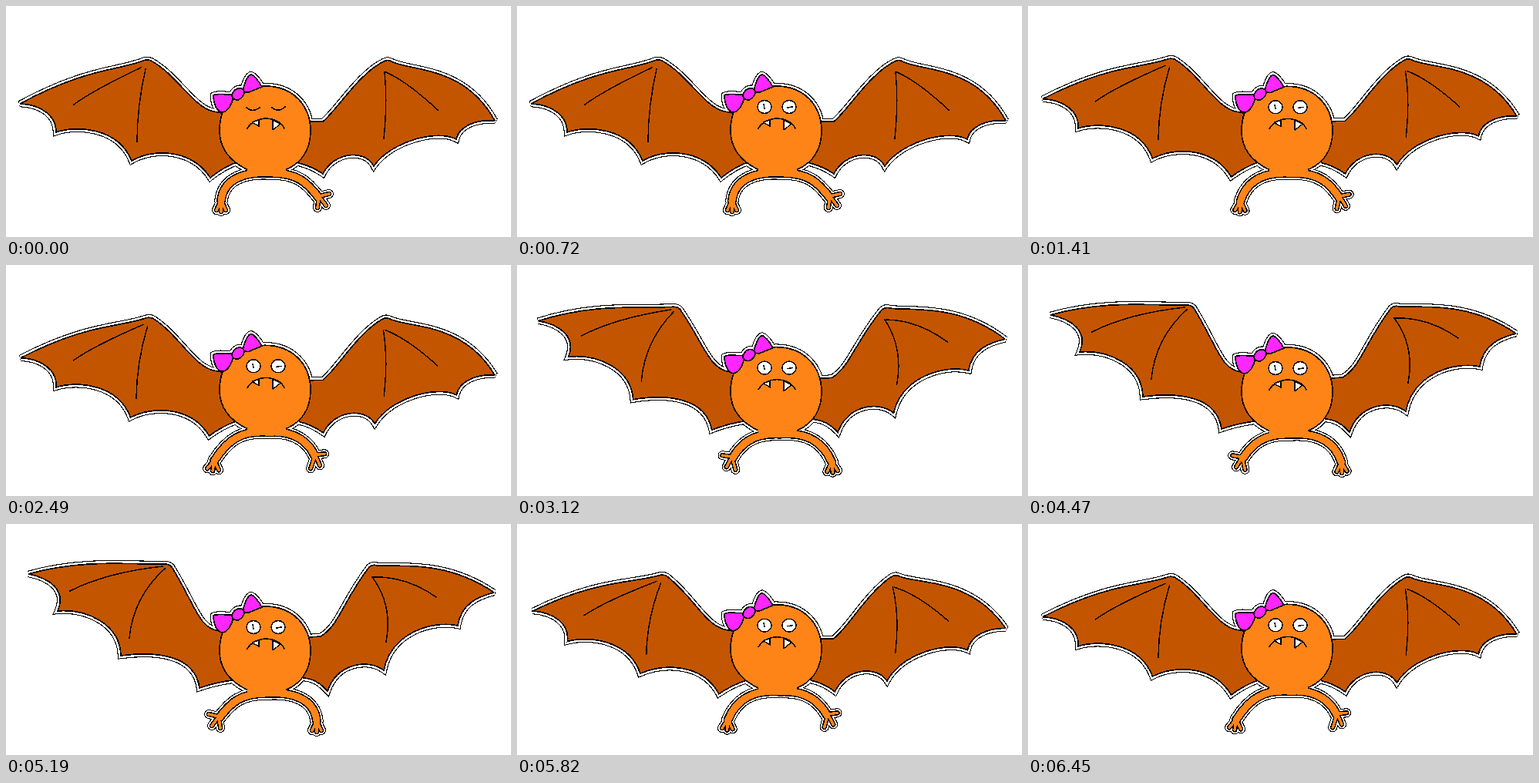
An HTML page that plays this animation: 655x300 px, repeating every 6480 ms.

```html
<!DOCTYPE html>
<html lang="en">
<head>
<meta charset="utf-8">
<title>Flapping bat</title>
<style>
  html, body { margin: 0; width: 100%; height: 100%; overflow: hidden; background: #fff; }
  svg { display: block; width: 655px; height: 300px; }
  path { stroke-linecap: round; stroke-linejoin: miter; stroke-miterlimit: 2; }
</style>
</head>
<body>
<svg id="stage" viewBox="0 0 655 300" shape-rendering="crispEdges"></svg>
<script>
const STEP = 30, COUNT = 216, MIRROR = 682;
const ORANGE = '#ff8418', BROWN = '#c45500', PINK = '#ff26ff', INK = '#000';
const stage = document.getElementById('stage');

function add(parent, tag, attrs = {}) {
  const el = document.createElementNS('http://www.w3.org/2000/svg', tag);
  for (const key in attrs) el.setAttribute(key, attrs[key]);
  return parent.appendChild(el);
}

// Blends the numbers of two paths that share the same commands.
function blend(a, b, k) {
  const to = b.match(/-?[\d.]+/g);
  let i = 0;
  return a.replace(/-?[\d.]+/g, n => (+n + (to[i++] - n) * k).toFixed(2));
}

function track(keys, x) {
  let i = 1;
  while (i < keys.length - 1 && x > keys[i][0]) i++;
  const [x0, a] = keys[i - 1], [x1, b] = keys[i], k = (x - x0) / (x1 - x0);
  return typeof a === 'number' ? a + (b - a) * k : blend(a, b, k);
}

// Down and up poses.
const leftWing = [
  'M320 160L277 138C245 138 226 92 188 71Q183 69 178 71C145 84 105 80 18 127C45 128 65 142 65 164C90 155 145 157 163 201C190 185 240 185 265 223Q281 210 299 203Z',
  'M320 160L277 139C250 136 246 106 215 56Q212 52 206 52C160 53 100 45 29 65C55 70 79 85 67 113C105 110 148 130 149 171C195 165 245 170 251 213Q271 206 293 203Z'];
const leftVeins = [
  'M175 80Q112 110 88 128M181 82Q170 130 170 176',
  'M203 55Q130 63 83 87M206 58Q165 95 160 148'];
const rightWing = [
  'M350 160L393 150L411 150C428 137 458 87 490 72Q495 69 500 72C525 85 595 77 634 149C612 147 588 155 584 173C560 160 500 175 477 208C465 185 425 190 411 218Q396 208 380 204Z',
  'M350 160L393 147L408 146C432 132 436 102 471 56Q475 52 482 54C510 56 570 46 633 89C610 95 590 105 586 132C555 125 500 140 490 190C470 175 430 180 417 217Q403 201 386 200Z'];
const rightVeins = [
  'M491 86Q495 125 490 172M493 86Q520 98 560 135',
  'M475 69Q502 105 493 153M477 69Q520 68 558 95'];

// Left arm poses along the swing; the right arm mirrors them.
const armKeys = [
  [0, 'M341 217C311 215 282 224 279 253'],
  [.35, 'M341 217C306 214 288 226 270 254'],
  [.65, 'M341 217C305 214 288 233 282 247'],
  [1, 'M341 217C304 216 291 230 277 248']];
const handKeys = [
  [0, 'M279 252L273 265M279 252L279 267M279 252L285 265'],
  [.35, 'M270 253L261 264M270 253L268 267M270 253L276 266'],
  [.65, 'M281 246L269 245M281 246L275 260M281 246L287 264'],
  [1, 'M276 247L263 244M276 247L267 259M276 247L278 262']];

const halo = add(stage, 'g');
const gap = add(stage, 'g');
const art = add(stage, 'g');

function layers(list) {
  return list.map(({ fill, width = 0 }) => {
    const solid = width ? 'none' : fill;
    const line = (g, extra, stroke) => add(g, 'path', { fill: solid, stroke, 'stroke-width': width + extra });
    return { halo: line(halo, 8.6, INK), gap: line(gap, 6.4, '#fff'), ink: line(art, width ? 3 : 1.7, INK), fill, width };
  });
}

function place(part, d, transform = '') {
  for (const el of [part.halo, part.gap, part.ink, part.top]) if (el) {
    el.setAttribute('d', d);
    el.setAttribute('transform', transform);
  }
}

const strokeOnly = { fill: 'none', stroke: INK, 'stroke-width': 1.5 };
const wings = [[leftWing, leftVeins], [rightWing, rightVeins]].map(([shape, veins]) => ({
  shape, veins, part: layers([{ fill: BROWN }])[0], lines: add(art, 'path', strokeOnly)
}));

const [body] = layers([{ fill: ORANGE }]);
const bodyPath = 'M277 162C277 125 302 104 336 104C372 104 395 129 395 162C395 188 382 204 364 212L312 212C292 202 277 186 277 162Z';
const arm = { fill: ORANGE, width: 9 }, hand = { fill: ORANGE, width: 3.5 };
const limbs = layers([arm, hand, arm, hand]);
for (const limb of limbs) {
  limb.top = add(art, 'path', { fill: 'none', stroke: limb.fill, 'stroke-width': limb.width });
}

const face = add(art, 'g');
add(face, 'rect', { x: 313, y: 204, width: 50, height: 12, fill: ORANGE });
const bowPaths = [
  'M296 114C288 117 277 112 269 116C269 126 273 138 281 138C288 137 293 128 296 114Z',
  'M307 110Q312 90 318 89Q324 91 332 105Q322 109 315 112Q311 113 307 110Z',
  'M293 116C295 108 303 104 308 109C311 114 306 120 301 122C296 122 293 120 293 116Z'];
const bow = layers(bowPaths.map(() => ({ fill: PINK })));

const line = (parent, d) => add(parent, 'path', { ...strokeOnly, d });
add(face, 'path', { d: 'M319 151L328 148L328 156ZM346 148L356 153L346 161Z', fill: '#fff', stroke: INK, 'stroke-width': 1.4 });
line(face, 'M313 159Q320 147 337 146Q355 147 361 159');
const openEyes = add(face, 'g');
for (const cx of [321, 353]) {
  add(openEyes, 'ellipse', { cx, cy: 131, rx: 9, ry: 8.5, fill: '#fff', stroke: INK, 'stroke-width': 1.5 });
}
line(openEyes, 'M320 128L321 133M351 132L357 131');
const shutEyes = line(face, 'M312 132Q320 139 329 132M345 132Q353 139 362 131');

// The arms follow the wing beat with a slowly wandering phase, in degrees.
const wander = [[0, 0], [47, -13], [83, -42], [125, 30], [149, -13], [173, 30], [215, -42]];
const wave = degrees => Math.cos(degrees * Math.PI / 180);

function draw(n) {
  const lift = .555 * (wave(6) - wave(30 * n - 6));
  const swing = (1 - wave(30 * n + track(wander, n))) / 2;
  const bob = `translate(0 ${(3 * lift).toFixed(2)})`;

  for (const { shape, veins, part, lines } of wings) {
    place(part, blend(...shape, lift));
    lines.setAttribute('d', blend(...veins, lift));
  }
  place(body, bodyPath, bob);
  bow.forEach((part, i) => place(part, bowPaths[i], bob));
  [swing, 1 - swing].forEach((s, side) => {
    const transform = bob + (side ? ` translate(${MIRROR} 0) scale(-1 1)` : '');
    place(limbs[side * 2], track(armKeys, s), transform);
    place(limbs[side * 2 + 1], track(handKeys, s), transform);
  });
  face.setAttribute('transform', bob);
  const shut = n < 4;
  openEyes.setAttribute('visibility', shut ? 'hidden' : 'visible');
  shutEyes.setAttribute('visibility', shut ? 'visible' : 'hidden');
}

const start = performance.now();
function tick() {
  draw(Math.floor((performance.now() - start) / STEP) % COUNT);
  requestAnimationFrame(tick);
}
tick();
</script>
</body>
</html>
```
